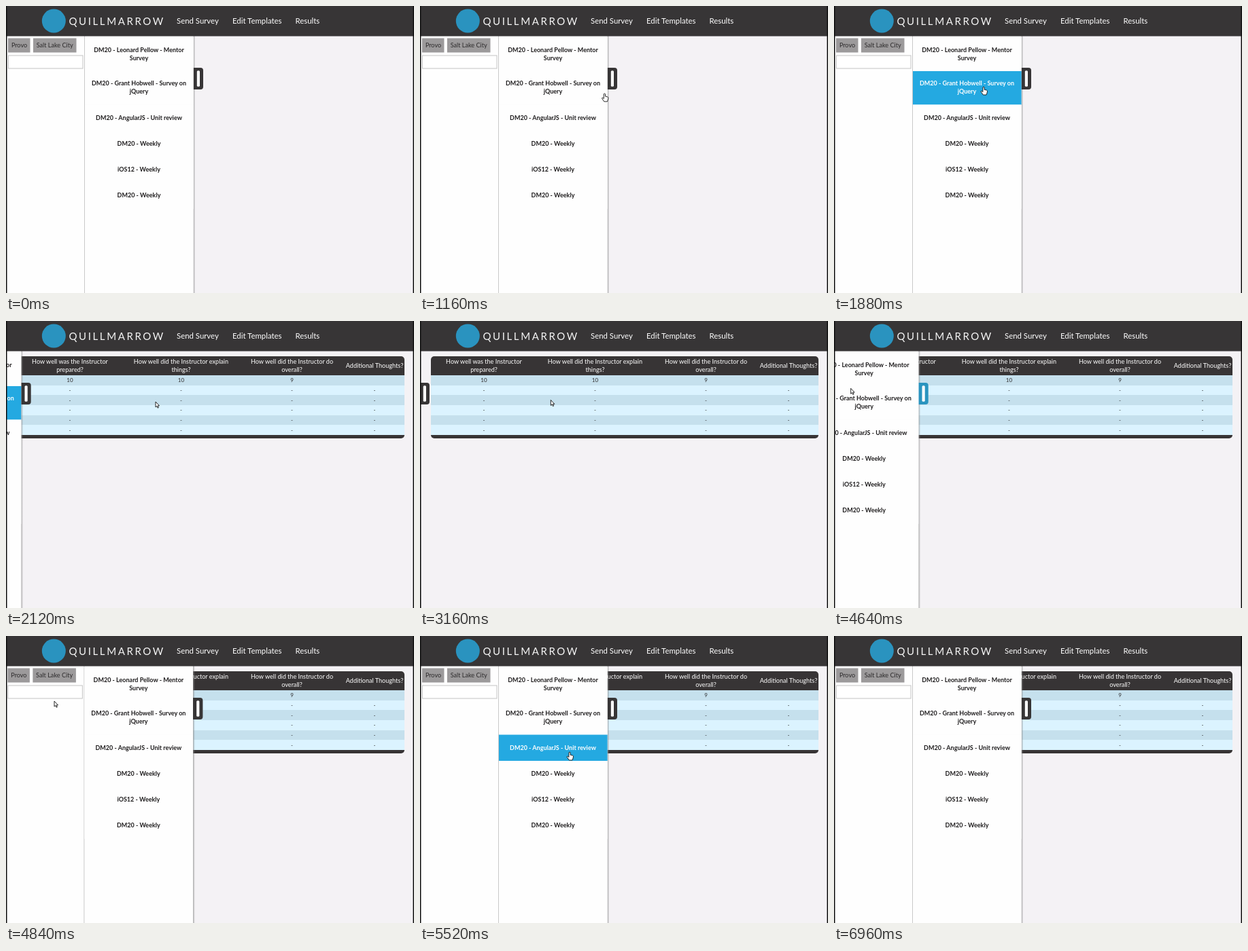
Animation, 600 px wide and 423 px high, one loop 7 s. Source, as an HTML page:

```html
<!DOCTYPE html>
<html lang="en">
<head>
<meta charset="utf-8">
<title>Survey results</title>
<style>
  html, body { margin: 0; width: 100%; height: 100%; overflow: hidden; background: #f4f2f5; }
  svg { display: block; width: 100vw; height: 100vh; }
  text { font: 9.1px Lato, "Open Sans", sans-serif; text-anchor: middle; fill: #2c2a2b; }
  .brand { font-size: 15px; letter-spacing: 2.6px; text-anchor: start; fill: #f4f4f4; }
  .nav { font-size: 11.4px; text-anchor: start; fill: #fff; }
  .head { fill: #fff; }
  .cell { font-size: 8px; }
  .item { font-size: 9px; font-weight: 700; }
  #table rect { shape-rendering: crispEdges; }
</style>
</head>
<body>
<svg id="stage" viewBox="0 0 600 423">
  <defs>
    <clipPath id="rounded"><rect x="16" y="52" width="570" height="121" rx="5"/></clipPath>
    <linearGradient id="shade">
      <stop stop-color="#888" stop-opacity=".75"/>
      <stop offset="1" stop-color="#888" stop-opacity="0"/>
    </linearGradient>
  </defs>
  <rect width="600" height="423" fill="#f4f2f5"/>
  <g id="table" clip-path="url(#rounded)"></g>
  <g id="sidebar">
    <rect x="275.5" y="44" width="3" height="379" fill="url(#shade)"/>
    <path id="handle" d="M275 91h11a4 4 0 0 1 4 4v24a4 4 0 0 1 -4 4h-11z"/>
    <rect x="280.8" y="95.3" width="4.2" height="23.4" rx="1.5" fill="#fff"/>
    <rect y="44" width="275.6" height="379" fill="#fefefe"/>
    <rect x="115" y="44" width="1" height="379" fill="#c9c9c9"/>
    <rect x="3" y="47.5" width="32.5" height="21" fill="#9c9a9b"/>
    <rect x="40" y="47.5" width="63.5" height="21" fill="#9c9a9b"/>
    <text x="19.5" y="61">Provo</text>
    <text x="71.7" y="61">Salt Lake City</text>
    <rect x="3.5" y="73" width="109.5" height="19" fill="#fff" stroke="#c4c4c4"/>
  </g>
  <rect width="600" height="44.5" fill="#373536"/>
  <circle cx="70.3" cy="22" r="17.5" fill="#2a93bf"/>
  <text class="brand" x="92.5" y="28">QUILLMARROW</text>
  <text class="nav" x="251" y="26">Send Survey</text>
  <text class="nav" x="333" y="26">Edit Templates</text>
  <text class="nav" x="425.5" y="26">Results</text>
  <path d="M0 0h1.5v423h-1.5zM598.5 0h1.5v423h-1.5z" fill="#111"/>
  <g id="cursor" stroke="#111" stroke-width=".9" stroke-linejoin="round" fill="#fff">
    <path id="arrow" d="M0 0v8l1.8-1.6 1.3 2.8 1.3-.6-1.3-2.7h2.4z"/>
    <path id="hand" d="M-1.1 .8q1.1-1.6 2.2 0v3.4l3.4.9q1.2.4 1 1.8l-.7 3.1-.8 2h-4.6l-3.2-4.6q-.2-1.4 1.2-1l1.5 1.2z"/>
  </g>
</svg>
<script>
const LOOP = 7000, SLIDE = 300, CLOSE_AT = 1925, OPEN_AT = 4560;
const DARK = [55, 53, 54], WHITE = [254, 254, 254], BLUE = [36, 169, 225], SKY = [37, 184, 242];
const $ = id => document.getElementById(id);

function add(parent, tag, attrs, text = "") {
  const el = document.createElementNS("http://www.w3.org/2000/svg", tag);
  for (const key in attrs) el.setAttribute(key, attrs[key]);
  el.textContent = text;
  return parent.appendChild(el);
}

function buildTable() {
  const table = $("table"), columns = [94, 257.5, 420.5, 542], rowHeight = 14.68;
  const heads = [
    ["How well was the Instructor", "prepared?"],
    ["How well did the Instructor explain", "things?"],
    ["How well did the Instructor do", "overall?"],
    ["Additional Thoughts?"]
  ];
  add(table, "rect", { x: 16, y: 52, width: 570, height: 121, fill: "#373435" });
  heads.forEach((lines, c) => lines.forEach((line, i) =>
    add(table, "text", { class: "head", x: columns[c], y: (lines.length > 1 ? 63 : 69) + 12 * i }, line)));
  for (let r = 0; r < 6; r++) {
    const y = 80 + r * rowHeight;
    add(table, "rect", { x: 16, y, width: 570, height: rowHeight, fill: r % 2 ? "#dbf3ff" : "#c5e0ed" });
    const values = r ? ["-", "-", "-", "-"] : ["10", "10", "9", ""];
    values.forEach((v, c) => add(table, "text", { class: "cell", x: columns[c], y: y + 10.3 }, v));
  }
}

// Each item: top, bottom, lines, then [on, off] hover spans.
const items = [
  [46, 96, ["DM20 - Leonard Pellow - Mentor", "Survey"]],
  [96, 145.5, ["DM20 - Grant Hobwell - Survey on", "jQuery"], [1165, 2140], [4990, 5140]],
  [145.5, 184, ["DM20 - AngularJS - Unit review"], [5140, 6290]],
  [184, 222, ["DM20 - Weekly"]],
  [222, 260, ["iOS12 - Weekly"]],
  [260, 299, ["DM20 - Weekly"]]
].map(([top, bottom, lines, ...spans]) => {
  const box = add($("sidebar"), "rect", { x: 116, y: top, width: 159.6, height: bottom - top });
  const first = (top + bottom) / 2 + (lines.length > 1 ? -3.5 : 2.9);
  const texts = lines.map((line, i) =>
    add($("sidebar"), "text", { class: "item", x: 195.5, y: first + 12 * i }, line));
  return { box, texts, spans };
});

const clamp = v => Math.min(1, Math.max(0, v));
const linear = p => p, smooth = p => p * p * (3 - 2 * p), easeOut = p => 1 - (1 - p) ** 3;
const mix = (a, b, p) => `rgb(${a.map((v, i) => Math.round(v + (b[i] - v) * p))})`;
const within = (t, spans) => spans.some(([on, off]) => t >= on && t < off);
const fade = (t, spans, ms = 150) =>
  Math.max(0, ...spans.map(([on, off]) => clamp((t - on) / ms) - clamp((t - off) / ms)));

// The CSS "ease" curve, cubic-bezier(.25, .1, .25, 1).
function ease(x) {
  if (x <= 0 || x >= 1) return clamp(x);
  const curve = (a, b, s) => 3 * a * s * (1 - s) ** 2 + 3 * b * s * s * (1 - s) + s ** 3;
  let lo = 0, hi = 1;
  for (let i = 0; i < 20; i++) {
    const mid = (lo + hi) / 2;
    if (curve(.25, .25, mid) < x) lo = mid; else hi = mid;
  }
  return curve(.1, 1, lo);
}

// Pointer stops: time, x, y and the easing used to get there.
const stops = [
  [320, 604, 412, linear], [1000, 340, 190, linear], [1160, 272, 129, linear],
  [1420, 220, 119, easeOut], [3000, 220, 119, linear], [3700, 14, 100, smooth],
  [4580, 14, 100, linear], [4800, 71, 96, smooth], [4850, 71, 96, linear],
  [5320, 220, 171, smooth], [6120, 220, 171, linear], [6640, 604, 228, smooth]
];
const handSpans = [[1150, 2000], [3640, 4600], [4980, 6280]];
const handleSpans = [[3640, 4600]];

function pointerAt(t) {
  const i = stops.findIndex(s => s[0] > t);
  if (i < 1) return null;
  const [t0, x0, y0] = stops[i - 1], [t1, x1, y1, easing] = stops[i];
  const p = easing((t - t0) / (t1 - t0));
  return [x0 + (x1 - x0) * p, y0 + (y1 - y0) * p];
}

function draw() {
  const t = performance.now() % LOOP;
  const closed = ease((t - CLOSE_AT) / SLIDE) - ease((t - OPEN_AT) / SLIDE);
  $("sidebar").setAttribute("transform", `translate(${-276 * closed} 0)`);
  $("table").style.display = t >= CLOSE_AT ? "" : "none";
  $("handle").style.fill = mix(DARK, SKY, fade(t, handleSpans));
  for (const { box, texts, spans } of items) {
    const hover = fade(t, spans);
    box.style.fill = mix(WHITE, BLUE, hover);
    for (const text of texts) text.style.fill = mix([30, 28, 29], WHITE, hover);
  }
  const pointer = pointerAt(t), isHand = within(t, handSpans);
  $("cursor").style.display = pointer ? "" : "none";
  if (pointer) $("cursor").setAttribute("transform", `translate(${pointer})`);
  $("hand").style.display = isHand ? "" : "none";
  $("arrow").style.display = isHand ? "none" : "";
  requestAnimationFrame(draw);
}

buildTable();
draw();
</script>
</body>
</html>
```
